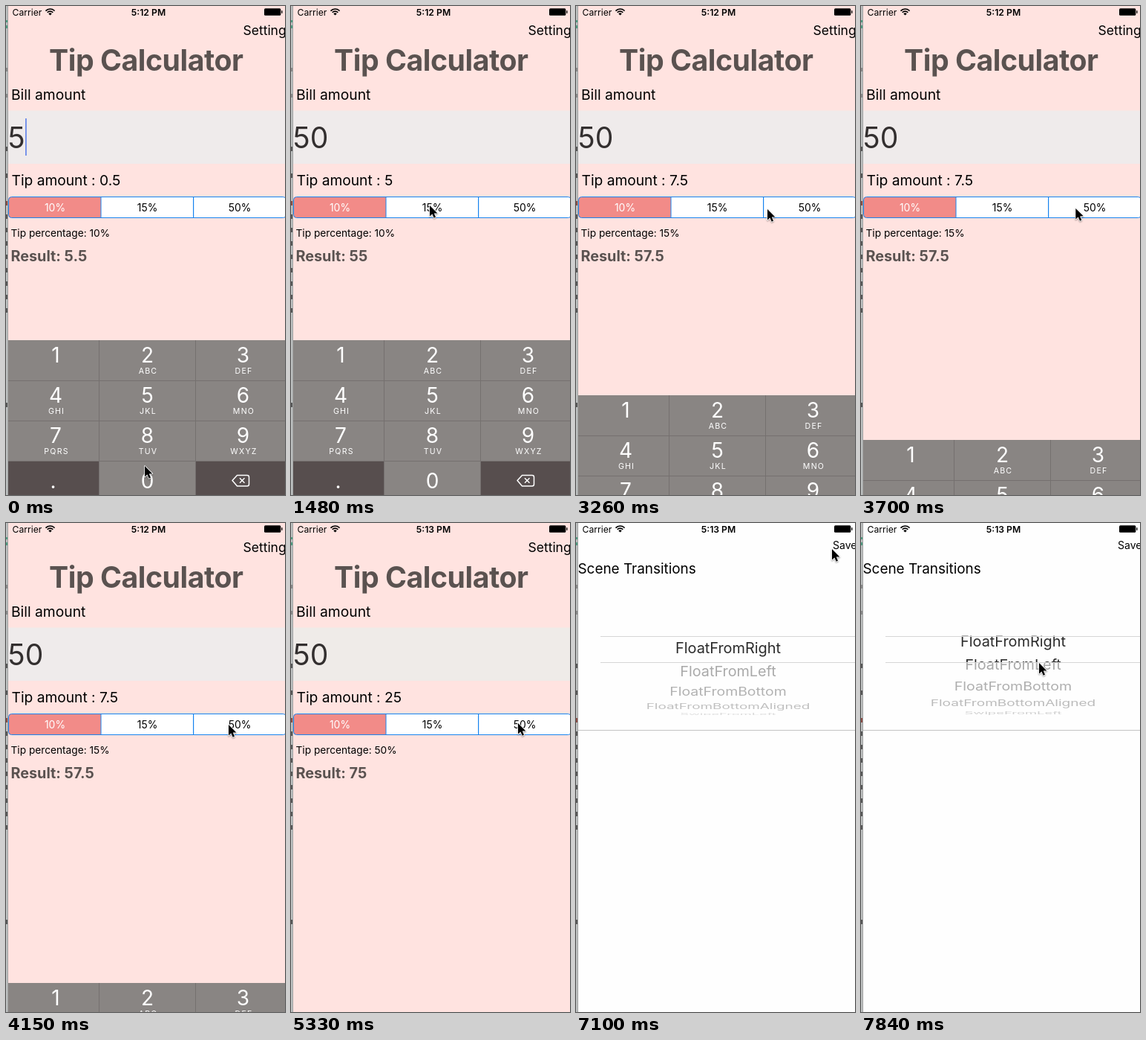
Animation, 376 px wide and 657 px high, one loop 7990 ms. Source, as an HTML page with a canvas:

```html
<!DOCTYPE html>
<html lang="en">
<head>
<meta charset="utf-8">
<title>Tip Calculator</title>
<style>
  html, body { margin: 0; width: 100%; height: 100%; overflow: hidden; }
  canvas { display: block; width: 376px; height: 657px; }
</style>
</head>
<body>
<canvas id="stage"></canvas>
<script>
const W = 376, H = 657, LOOP = 7990;
const canvas = document.getElementById('stage');
const ctx = canvas.getContext('2d');
const dpr = window.devicePixelRatio || 1;
canvas.width = W * dpr;
canvas.height = H * dpr;

const INK = '#5a5250';
const TYPE_AT = 450, TAP_15 = 2925, TAP_50 = 4700, CLOCK_AT = 4850;
const SLIDE_AT = 6480, SLIDE_MS = 560;

// Pointer waypoints: time, x, y
const PATH = [
  [0, 187, 618], [150, 187, 618], [590, 190, 626], [850, 190, 626],
  [1400, 186, 268], [1480, 187, 268], [1900, 188, 268], [2080, 191, 270],
  [2930, 191, 270], [3260, 258, 273], [3650, 289, 272], [4150, 300, 271],
  [4350, 306, 269], [5350, 306, 269], [6200, 345, 35], [7110, 345, 35],
  [7540, 240, 197], [7610, 240, 197], [7840, 240, 188], [LOOP, 240, 182]
];
const PICKER = ['FloatFromRight', 'FloatFromLeft', 'FloatFromBottom',
  'FloatFromBottomAligned', 'SwipeFromLeft'];
const KEYS = [['1', ''], ['2', 'ABC'], ['3', 'DEF'], ['4', 'GHI'], ['5', 'JKL'],
  ['6', 'MNO'], ['7', 'PQRS'], ['8', 'TUV'], ['9', 'WXYZ'], ['.', ''], ['0', '']];

function rect(color, x, y, w, h) {
  ctx.fillStyle = color;
  ctx.fillRect(x, y, w, h);
}

function text(str, x, y, size, { color = '#000', weight = 400, align = 'left', spacing = 0 } = {}) {
  ctx.font = `${weight} ${size}px Inter, sans-serif`;
  ctx.letterSpacing = spacing + 'px';
  ctx.textAlign = align;
  ctx.fillStyle = color;
  ctx.fillText(str, x, y);
}

function line(color, width, ...points) {
  ctx.strokeStyle = color;
  ctx.lineWidth = width;
  ctx.beginPath();
  points.forEach(([x, y]) => ctx.lineTo(x, y));
  ctx.stroke();
}

function pointerAt(t) {
  const i = Math.max(1, PATH.findIndex(p => p[0] > t));
  const [t0, x0, y0] = PATH[i - 1], [t1, x1, y1] = PATH[i];
  const k = (t - t0) / (t1 - t0);
  const e = k * k * (3 - 2 * k);
  return [x0 + (x1 - x0) * e, y0 + (y1 - y0) * e];
}

function drawDesktopEdge() {
  rect('#bcbfbf', 0, 0, 2, H);
  rect('#a2a4a4', 2, 0, 1, H);
  rect('#4f9a80', 0, 19, 2, 3);
  rect('#4f9a80', 0, 26, 2, 4);
  rect('#888', 0, 83, 2, 5);
  rect('#888', 0, 118, 2, 5);
  for (const y of [189, 225, 533]) rect('#555', 0, y, 2, 6);
  rect('#8a4a44', 0, 262, 2, 6);
  for (let y = 280; y < 410; y += 18) rect('#555', 0, y, 2, 6);
}

function drawStatusBar(t) {
  text('Carrier', 8.5, 12.5, 12.2);
  text(t < CLOCK_AT ? '5:12 PM' : '5:13 PM', 192, 12.5, 12.2, { weight: 600, align: 'center' });
  ctx.strokeStyle = '#000';
  ctx.lineWidth = 1.7;
  for (const r of [5.2, 8.3]) {
    ctx.beginPath();
    ctx.arc(59.5, 12.3, r, -Math.PI * .76, -Math.PI * .24);
    ctx.stroke();
  }
  ctx.fillStyle = '#000';
  ctx.beginPath();
  ctx.moveTo(59.5, 12.5);
  ctx.arc(59.5, 12.5, 3, -Math.PI * .76, -Math.PI * .24);
  ctx.fill();
  ctx.beginPath();
  ctx.roundRect(348, 3.3, 22.3, 9.4, 1.5);
  ctx.fill();
  rect('#000', 371.2, 6.2, 1.3, 3.6);
}

function drawSegments() {
  const outline = () => {
    ctx.beginPath();
    ctx.roundRect(3.5, 256.5, 374, 28, 4);
  };
  ctx.save();
  outline();
  ctx.clip();
  rect('#fff', 3, 256, 375, 29);
  rect('#f28b88', 3, 256, 125, 29);
  ctx.restore();
  outline();
  ctx.strokeStyle = '#1683ee';
  ctx.lineWidth = 1;
  ctx.stroke();
  line('#1683ee', 1, [128, 257], [128, 284]);
  line('#1683ee', 1.2, [252.6, 257], [252.6, 284]);
  ['10%', '15%', '50%'].forEach((label, i) =>
    text(label, 66 + i * 124.5, 276, 13.9, { color: i ? '#000' : '#fff', align: 'center' }));
}

function drawBackspace() {
  ctx.lineJoin = 'round';
  ctx.strokeStyle = '#fff';
  ctx.lineWidth = 1.5;
  ctx.beginPath();
  ctx.moveTo(305, 637.5);
  ctx.lineTo(311.5, 630.5);
  ctx.arcTo(327.5, 630.5, 327.5, 633, 2.5);
  ctx.arcTo(327.5, 645, 325, 645, 2.5);
  ctx.lineTo(311.5, 645);
  ctx.closePath();
  ctx.stroke();
  line('#fff', 1.5, [315, 634.3], [321.5, 640.8]);
  line('#fff', 1.5, [321.5, 634.3], [315, 640.8]);
}

function drawKeyboard(t) {
  if (t >= 5180) return;
  const drop = t < TAP_15 ? 0 : 216 * (1 - Math.exp(-1.252 * (t - TAP_15) / 1000));
  const zeroDown = t > 290 && t < 520;
  ctx.save();
  ctx.translate(0, Math.round(drop));
  rect('#898583', 3, 449, 373, 216);
  rect('#574e4e', 3, 611, 122, 54);
  rect('#574e4e', 256, 611, 120, 54);
  if (zeroDown) rect('#574e4e', 126, 611, 129, 54);
  for (const x of [125.5, 255.5]) line('#75706f', 1, [x, 449], [x, 665]);
  for (const y of [503.5, 557.5, 611.5]) line('#75706f', 1, [3, y], [376, y]);
  KEYS.forEach(([digit, letters], i) => {
    const x = [67, 190.5, 319.5][i % 3], row = Math.floor(i / 3);
    const y = row === 3 ? 648 : 479 + row * 54;
    const white = { color: '#fff', align: 'center' };
    text(digit, digit === '.' ? 63.5 : x, y, 28, white);
    if (letters) text(letters, x + 1, y + 15, 10.6, { ...white, spacing: 1.2 });
  });
  drawBackspace();
  ctx.restore();
}

function drawCalculator(t) {
  const bill = t < TYPE_AT ? 5 : 50;
  const percent = t < TAP_15 ? 10 : t < TAP_50 ? 15 : 50;
  const tip = bill * percent / 100;

  rect('#ffe3e0', 3, 0, 373, H);
  const pressed = t > SLIDE_AT - 40 && t < SLIDE_AT + 160;
  text('Setting', 319.5, 39, 17.5, { color: pressed ? '#0006' : '#000' });
  text('Tip Calculator', 58, 87, 39.2, { color: INK, weight: 700, spacing: -.45 });
  text('Bill amount', 7, 126, 19.3);

  rect(t < CLOCK_AT ? '#efebeb' : '#efebe8', 3, 140.5, 373, 71.5);
  text(String(bill), 2.5, 190.5, 39, { color: '#332f2f' });
  const caretOn = t < 960 || (t > 1950 && t < 2500);
  if (caretOn) rect('#6c8bea', bill === 5 ? 26 : 51, 151, 1.8, 50);

  text(`Tip amount : ${tip}`, 7.5, 241, 19.2);
  drawSegments();
  text(`Tip percentage: ${percent}%`, 6.5, 310, 13.7);
  text(`Result: ${bill + tip}`, 6.5, 343, 19.8, { color: INK, weight: 700 });
  drawKeyboard(t);
}

// Rows sit on a wheel, 20 degrees apart
function drawPickerRows(scroll, selected) {
  const step = Math.PI / 9, radius = 90.6;
  PICKER.forEach((name, i) => {
    const angle = i * step - scroll / radius;
    const depth = Math.cos(angle);
    if (depth <= 0) return;
    ctx.save();
    ctx.translate(205, 168 + radius * Math.sin(angle));
    ctx.scale(1 - .1 * (1 - depth), depth);
    ctx.globalAlpha = selected ? 1 : .37 * Math.sqrt(depth);
    text(name, 0, 7.2, 19.9, { color: selected ? '#2c2c2c' : '#111', align: 'center' });
    ctx.restore();
  });
}

function clipped(x, y, w, h, draw) {
  ctx.save();
  ctx.beginPath();
  ctx.rect(x, y, w, h);
  ctx.clip();
  draw();
  ctx.restore();
}

function drawSettings(t) {
  if (t < SLIDE_AT) return;
  const k = Math.min(1, (t - SLIDE_AT) / SLIDE_MS);
  const scroll = Math.max(0, t - 7610) * 9 / 230;
  ctx.save();
  ctx.translate(0, H * (1 - k) ** 3);
  rect('#fefefe', 3, 0, 373, H);
  text('Save', 346, 35, 14);
  text('Scene Transitions', 2.5, 68, 18.9);
  clipped(33, 100, 343, 52, () => drawPickerRows(scroll, false));
  clipped(33, 152, 343, 35, () => drawPickerRows(scroll, true));
  clipped(33, 187, 343, 71, () => drawPickerRows(scroll, false));
  line('#d6d6d6', 1, [33, 152.5], [376, 152.5]);
  line('#d6d6d6', 1, [33, 187.5], [376, 187.5]);
  line('#c4c4c4', 1, [3, 278.5], [376, 278.5]);
  ctx.restore();
}

function drawPointer(t) {
  const arrow = [[0, 0], [0, 14.6], [3.4, 11.5], [5.7, 16.8], [8, 15.7], [5.8, 10.6], [10.4, 10.4]];
  ctx.save();
  ctx.translate(...pointerAt(t));
  ctx.beginPath();
  arrow.forEach(([x, y]) => ctx.lineTo(x, y));
  ctx.closePath();
  ctx.lineJoin = 'round';
  ctx.strokeStyle = '#fff';
  ctx.lineWidth = 1.6;
  ctx.shadowColor = '#0006';
  ctx.shadowBlur = 2 * dpr;
  ctx.shadowOffsetY = dpr;
  ctx.stroke();
  ctx.shadowColor = 'transparent';
  ctx.fillStyle = '#000';
  ctx.fill();
  ctx.restore();
}

function frame() {
  const t = performance.now() % LOOP;
  ctx.setTransform(dpr, 0, 0, dpr, 0, 0);
  drawCalculator(t);
  drawSettings(t);
  drawStatusBar(t);
  drawDesktopEdge();
  drawPointer(t);
  requestAnimationFrame(frame);
}
frame();
</script>
</body>
</html>
```
